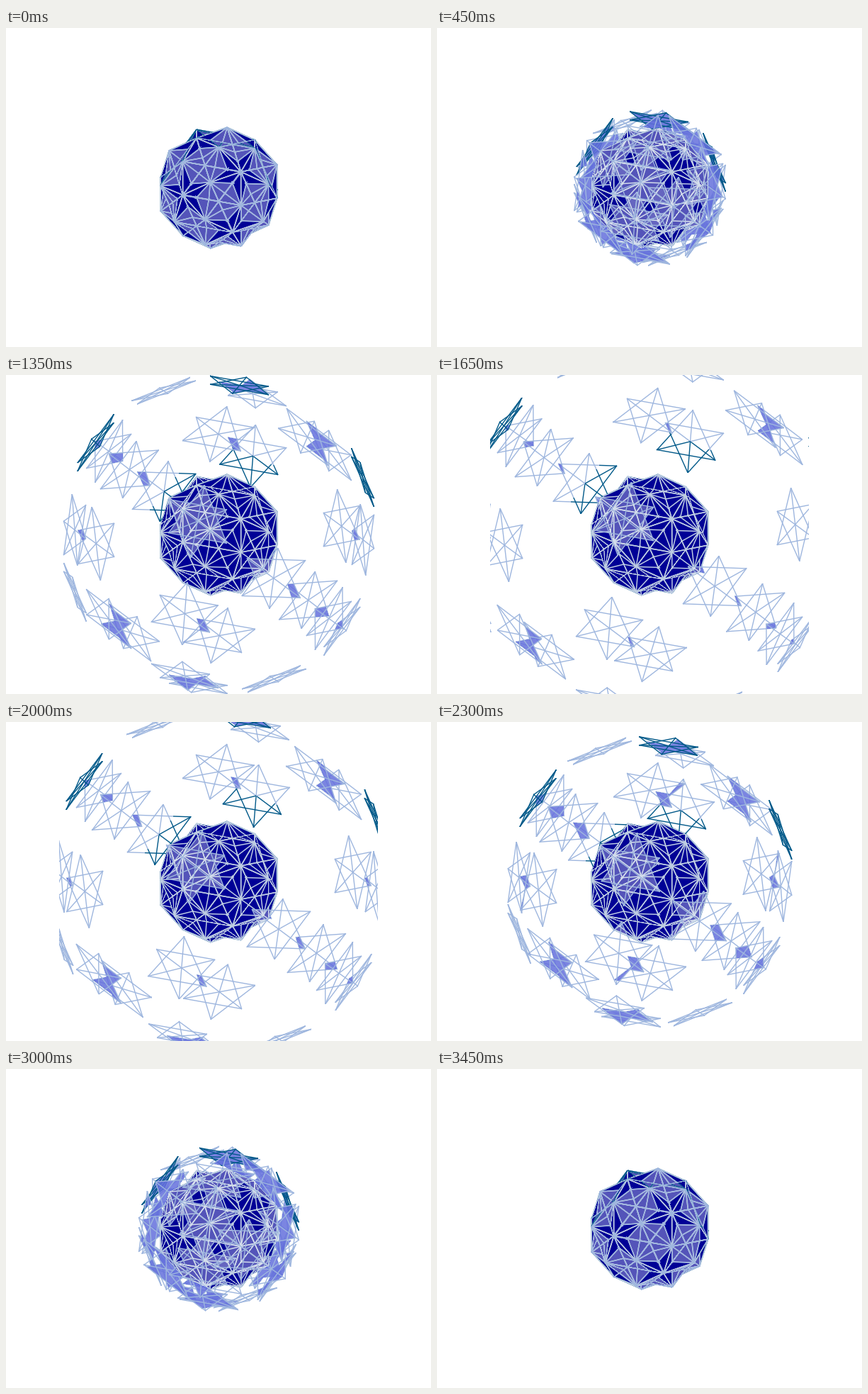
An HTML page with a canvas for the animation above (3500 ms loop, 600x450 px).

```html
<!DOCTYPE html>
<html>
<head>
<meta charset="utf-8">
<style>
  html, body { margin: 0; width: 600px; height: 450px; overflow: hidden; background: #fff; }
  canvas { display: block; margin-left: 75px; }
</style>
</head>
<body>
<canvas id="view" width="450" height="450"></canvas>
<script>
const SIZE = 450, MID = 225, SCALE = 88.7, LOOP = 3500, STEP = 50;
const ctx = document.getElementById('view').getContext('2d');
const image = ctx.createImageData(SIZE, SIZE), px = image.data;
const depth = new Float32Array(SIZE * SIZE);
const touched = new Uint8Array(SIZE * SIZE);

const PALE = [190, 205, 226], SKY = [158, 182, 222], TEAL = [0, 88, 136], BLUE = [100, 112, 220];
const NAVY = [0, 0, 150], DEEP_TEAL = [0, 55, 95], WHITE = [255, 255, 255];

// Icosahedral directions
const G = (Math.sqrt(5) - 1) / 2, H = (1 + G) / 2;
const cycle = ([a, b, c]) => [[a, b, c], [b, c, a], [c, a, b]];
const signs = [1, -1];
const dot = (a, b) => a[0] * b[0] + a[1] * b[1] + a[2] * b[2];
const cross = (a, b) => [a[1] * b[2] - a[2] * b[1], a[2] * b[0] - a[0] * b[2], a[0] * b[1] - a[1] * b[0]];
const unit = a => a.map(x => x / Math.hypot(...a));

const fiveFold = signs.flatMap(s => signs.flatMap(t => cycle([s * G, 0, t]))).map(unit);
const twoFold = signs.flatMap(s => cycle([0, 0, s]));
for (const r of signs) for (const s of signs) for (const t of signs) twoFold.push(...cycle([r * G / 2, s / 2, t * H]));

const camera = [[.9245, -.355, -.1375], [-.3688, -.9254, -.0872], [.0963, -.1313, .9865]];
const project = p => camera.map(row => dot(row, p) * SCALE);

const planes = twoFold.map(n => {
  const five = fiveFold.find(a => dot(a, n) > .8);
  const u = unit(five.map((x, i) => x - dot(five, n) * n[i]));
  return { n: project(n), u: project(u), v: project(cross(n, u)) };
}).sort((a, b) => a.n[2] - b.n[2]);

// Outline points of one face, in its own plane
const A = [.5, 0], B = [G / 2, .5], C = [-G / 2, .5], D = [-.5, 0], E = [-G / 2, -.5], F = [G / 2, -.5];
const starEdges = [[A, C], [A, E], [D, B], [D, F], [C, E], [B, F], [A, D], [B, E], [C, F]];
const coreEdges = [...starEdges, [A, B], [A, F], [D, C], [D, E]];
const inTriangle = (u, v) => u > -G / 2 && Math.abs(v) < G * (.5 - u);
const inStar = (u, v) => inTriangle(u, v) || inTriangle(-u, v);
const inCore = (u, v) => {
  u = Math.abs(u); v = Math.abs(v);
  return H * u + G / 2 * v < H / 2 && v < G * (.5 + u);
};

function mix(i, color, alpha) {
  for (let k = 0; k < 3; k++) px[i * 4 + k] += (color[k] - px[i * 4 + k]) * alpha;
}

function fillFace({ n, u, v }, reach, inside, paint) {
  const [cx, cy, cz] = n.map(x => x * reach), det = u[0] * v[1] - u[1] * v[0];
  const x0 = Math.max(0, Math.floor(MID + cx - 56)), x1 = Math.min(SIZE - 1, MID + cx + 56);
  const y0 = Math.max(0, Math.floor(MID + cy - 56)), y1 = Math.min(SIZE - 1, MID + cy + 56);
  for (let y = y0; y <= y1; y++) for (let x = x0; x <= x1; x++) {
    const dx = x - MID - cx, dy = y - MID - cy;
    const a = (dx * v[1] - dy * v[0]) / det, b = (dy * u[0] - dx * u[1]) / det;
    if (inside(a, b)) paint(y * SIZE + x, cz + a * u[2] + b * v[2]);
  }
}

function drawEdge({ n, u, v }, reach, [p, q], width, colorAt) {
  const at = ([a, b]) => n.map((x, k) => x * reach + a * u[k] + b * v[k]);
  const s = at(p), e = at(q), d = e.map((x, k) => x - s[k]);
  const major = Math.abs(d[0]) > Math.abs(d[1]) ? 0 : 1, minor = 1 - major;
  const slant = Math.abs(d[major]) / Math.hypot(d[0], d[1]);
  const from = Math.ceil(Math.min(s[major], e[major]) - .5), to = Math.max(s[major], e[major]) + .5;
  for (let m = from; m <= to; m++) {
    const f = Math.min(1, Math.max(0, (m - s[major]) / d[major]));
    const w = s[minor] + f * d[minor], z = s[2] + f * d[2];
    for (let k = Math.floor(w) - 1; k <= Math.floor(w) + 2; k++) {
      const x = MID + (major ? k : m), y = MID + (major ? m : k);
      if (x < 0 || y < 0 || x >= SIZE || y >= SIZE) continue;
      const i = y * SIZE + x, cover = Math.min(1, width / 2 + .5 - Math.abs(k - w) * slant);
      if (cover > 0 && z > depth[i] - 1.5) mix(i, colorAt(z), cover);
    }
  }
}

// Distance travelled: almost still at first, then a steady speed out and back
function travel(time) {
  const t = Math.min(time, LOOP - time) - 255;
  return .135 * (t + Math.hypot(t, 40)) / 2;
}

function draw(time) {
  px.fill(255);
  depth.fill(-1e4);
  touched.fill(0);

  for (const plane of planes) fillFace(plane, H, inCore, (i, z) => {
    if (z <= depth[i]) return;
    depth[i] = z;
    touched[i] = 1;
    mix(i, plane.n[2] < 0 ? DEEP_TEAL : NAVY, 1);
  });
  for (const plane of planes) for (const edge of coreEdges)
    drawEdge(plane, H, edge, 1.5, () => plane.n[2] < 0 ? TEAL : PALE);

  const reach = H + travel(time) / SCALE;
  for (const plane of planes) {
    fillFace(plane, reach, inStar, (i, z) => {
      if (z < depth[i] - .8) return;
      if (depth[i] > -1e4) mix(i, WHITE, touched[i] === 1 ? .33 : .1);
      else if (touched[i]) mix(i, BLUE, .85);
      touched[i] = 2;
    });
    // Faces turned upwards lie in shade; far ones only on their deeper half
    const tilt = plane.n[2] / SCALE, upper = plane.n[1] < 0;
    const shade = upper && (tilt < -.7 ? plane.n[2] * reach : tilt > .05 && tilt < .28 && 1e4);
    for (const edge of starEdges)
      drawEdge(plane, reach, edge, 1.4, z => shade && z < shade ? TEAL : SKY);
  }
  ctx.putImageData(image, 0, 0);
}

function tick() {
  draw(Math.floor(performance.now() % LOOP / STEP) * STEP);
  requestAnimationFrame(tick);
}
tick();
</script>
</body>
</html>
```
